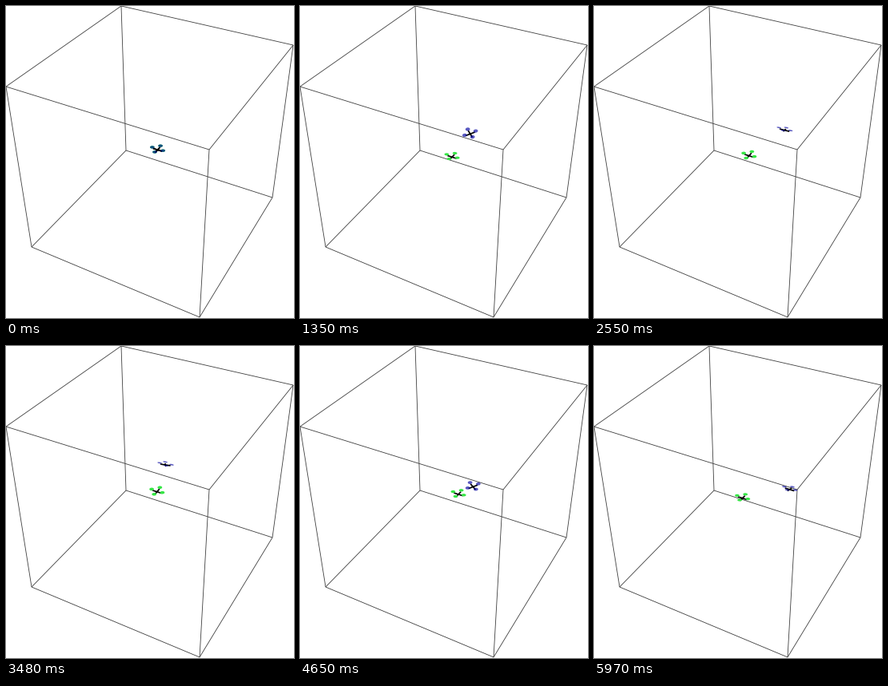
Recreate the animation shown at these times as a matplotlib script. Size 360 by 391 pixels, loop 6 s.

```python
import numpy as np
import matplotlib.pyplot as plt
from matplotlib.animation import FuncAnimation
from matplotlib.collections import LineCollection
from matplotlib.patches import Polygon

W, H, DPI = 360, 391, 100
FRAMES, STEP = 200, 30
PX = 72 / DPI
ARM, ROTOR, LIFT = 0.031, 0.38, 0.2
# Screen directions of the unit x, y and z axes near the middle of the box.
AXES = np.array([[215, 69], [115, -126], [0, -196]])
TURN = np.linspace(0, 2 * np.pi, 36, endpoint=False)


def smooth(keys):
    """Cubic Hermite curve through (seconds, x, y) points, at rest at the start."""
    keys = np.array(keys, float)
    ts, vs = keys[:, 0], keys[:, 1:]
    slopes = np.gradient(vs, ts, axis=0)
    slopes[0] = 0

    def at(t):
        i = int(np.clip(np.searchsorted(ts, t, "right") - 1, 0, len(ts) - 2))
        h = ts[i + 1] - ts[i]
        u = (t - ts[i]) / h
        return ((1 + 2 * u) * (1 - u) ** 2 * vs[i] + u * (1 - u) ** 2 * h * slopes[i]
                + u * u * (3 - 2 * u) * vs[i + 1] + u * u * (u - 1) * h * slopes[i + 1])

    return at


def frame_axes(yaw, pitch):
    """Screen vectors of both half arms and of the drone's upward axis."""
    c, s = np.cos(yaw), np.sin(yaw)
    cp, sp = np.cos(pitch), np.sin(pitch)
    body = np.array([[c, s * cp, -s * sp], [-s, c * cp, -c * sp], [0, sp, cp]])
    return ARM * body @ AXES


class Drone:
    """Two crossed arms carrying four rotor discs just above their tips."""

    def __init__(self, ax, color, alpha, path, yaw, pitch, z):
        self.path, self.yaw, self.pitch = smooth(path), yaw, pitch
        self.arms = LineCollection([], colors="black", linewidths=1.7 * PX, zorder=z)
        ax.add_collection(self.arms)
        self.rotors = [ax.add_patch(Polygon(np.zeros((3, 2)), fc=color, ec="none",
                                            alpha=alpha, zorder=z)) for _ in range(4)]

    def pose(self, t):
        c = self.path(t)
        a, b, up = frame_axes(self.yaw(t), self.pitch(t))
        disc = ROTOR * (np.outer(np.cos(TURN), a) + np.outer(np.sin(TURN), b))
        for rotor, tip in zip(self.rotors, (a, b, -a, -b)):
            rotor.set_xy(c + tip + LIFT * up + disc)
        self.arms.set_segments([[c - v, c + v] for v in (0.85 * a, 0.85 * b)])
        return [self.arms, *self.rotors]


fig = plt.figure(figsize=(W / DPI, H / DPI), dpi=DPI, facecolor="white")
ax = fig.add_axes([0, 0, 1, 1])
ax.set_xlim(0, W)
ax.set_ylim(H, 0)
ax.axis("off")

top = [(144, 0), (359, 49), (254, 180), (0, 101)]
base = [(150, 181), (333, 240), (242, 390), (32, 302)]
edges = [e for ring in (top, base) for e in zip(ring, ring[1:] + ring[:1])]
edges += list(zip(top, base))
ax.add_collection(LineCollection(edges, colors="#404040", linewidths=0.85 * PX, zorder=1))

start = (0, 189.5, 180.3)
green = Drone(
    ax, "#35e645", 1,
    [start, (1, 187, 191.5), (1.35, 190, 189.3), (2.55, 193.8, 187.7),
     (3.48, 188.8, 182.7), (4.11, 199.3, 182.7), (5.13, 193.3, 189), (5.97, 185.6, 190.7)],
    yaw=lambda t: 0,
    pitch=lambda t: 0.06 * np.sin(1.4 * t), z=2)

blue = Drone(
    ax, "#0000a0", 0.65,
    [start, (0.6, 217, 187), (0.93, 226, 177), (1.35, 212.8, 160.3), (1.81, 165, 152.5),
     (2.2, 205, 138), (2.54, 238, 155.5), (3.16, 167, 126), (3.48, 199.3, 149),
     (3.68, 214, 153), (4.11, 197.3, 170.7), (5.13, 240.8, 175.8), (5.97, 244.5, 179.8)],
    yaw=lambda t: -0.68 * np.sin(np.pi * (0.25 * t + 0.07 * t * t)),
    pitch=lambda t: 0.045 * t - 0.33 * np.sin(1.6 * t), z=3)


def draw(frame):
    t = frame * STEP / 1000
    return green.pose(t) + blue.pose(t)


anim = FuncAnimation(fig, draw, frames=FRAMES, interval=STEP, repeat=True, repeat_delay=0)
plt.show()
```
